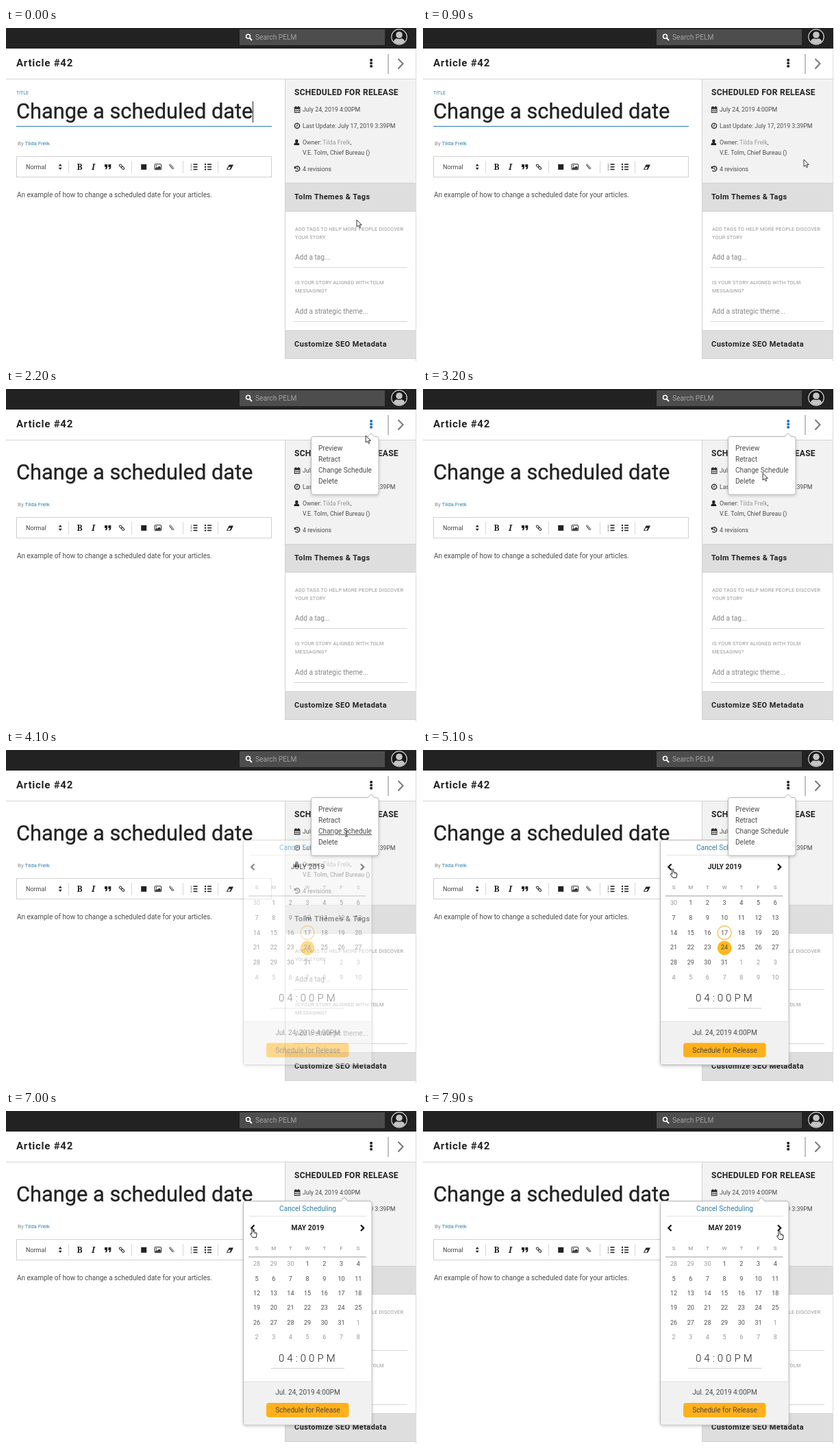
These frames come from a looping animation (600 by 486 pixels, 8 s). An HTML page:

```html
<!DOCTYPE html>
<html lang="en">
<head>
<meta charset="utf-8">
<title>Change a scheduled date</title>
<style>
  html, body { margin: 0; width: 100%; height: 100%; overflow: hidden; background: #fff; }
  svg { display: block; width: 100%; height: 100%; }
  text { font-family: Roboto, "Open Sans", sans-serif; white-space: pre; }
</style>
</head>
<body>
<svg id="stage" viewBox="0 0 600 486"></svg>
<script>
const LOOP = 8000;
const INK = '#222', BODY = '#4c4c4c', BLUE = '#2b7fab', AMBER = '#ffb01a';

// Markup helpers
const attrs = o => Object.entries(o).map(([k, v]) => ` ${k}="${v}"`).join('');
const text = (x, y, size, fill, label, more = {}) =>
  `<text${attrs({ x, y, 'font-size': size, fill, ...more })}>${label}</text>`;
const rect = (x, y, width, height, fill, more = {}) =>
  `<rect${attrs({ x, y, width, height, fill, ...more })}/>`;
const circle = (cx, cy, r, fill, more = {}) => `<circle${attrs({ cx, cy, r, fill, ...more })}/>`;
const path = (d, fill, more = {}) => `<path${attrs({ d, fill, ...more })}/>`;
const stroke = (d, color, width = 1, more = {}) =>
  path(d, 'none', { stroke: color, 'stroke-width': width, ...more });
const group = (id, body, more = {}) => `<g${attrs({ id, ...more })}>${body}</g>`;
const BOLD = { 'font-weight': 700 }, LIGHT = { 'font-weight': 300 }, MID = { 'text-anchor': 'middle' };
const spaced = n => ({ 'letter-spacing': n });

function topBars() {
  return rect(0, 0, 599, 30, '#222') +
    rect(341, 2, 212, 23, '#4d4d4d') +
    circle(353.5, 12.3, 3, 'none', { stroke: '#fff', 'stroke-width': 1.6 }) +
    stroke('M355.7 14.6L359 18', '#fff', 2) +
    text(364, 16.7, 10.2, '#a2a2a2', 'Search PELM') +
    circle(574, 13, 11.2, '#161616', { stroke: '#d8d8d8', 'stroke-width': 1.2 }) +
    circle(574, 10, 4.8, '#c4c4c4') +
    path('M565.8 20Q566.8 15.6 570.5 15.2Q574 16.6 577.5 15.2Q581.2 15.6 582.2 20Q578.8 23.6 574 23.6T565.8 20Z', '#c4c4c4') +
    text(15, 55.5, 15, INK, 'Article #42', { ...BOLD, ...spaced(.75) }) +
    stroke('M0 74.5H599', '#d4d4d4') +
    group('dots', [46.8, 51.3, 55.8].map(y => rect(531.3, y - 1.8, 3.7, 3.6, 'inherit', { rx: 1.2 })).join('')) +
    stroke('M558 38V67', '#999', 1.2) +
    stroke('M572.5 45L579.5 52L572.5 59.5', '#777', 2);
}

function toolbar() {
  const listRows = [199, 202.7, 206.4];
  const quote = x => path(`M${x} 199h4v4q0 3-3 3.5v-1.6q1-.4 1-1.9h-2Z`, INK);
  const lists = listRows.map((y, i) =>
    rect(273.5, y - .8, 6, 1.6, INK) + rect(294, y - .8, 6, 1.6, INK) + circle(291, y, 1.2, INK) +
    text(269.3, y + 1.5, 4.2, INK, i + 1)).join('');
  return rect(15.5, 187.5, 372, 30, '#fff', { stroke: '#d0d0d0' }) +
    stroke('M91.5 194V212M183.5 194V212M258.5 194V212M309.5 194V212', '#d8d8d8') +
    text(29, 206, 9, '#444', 'Normal') +
    path('M76.7 201.6L79.2 198.3L81.7 201.6ZM76.7 203.8H81.7L79.2 207Z', INK) +
    text(103.6, 206.6, 12, INK, 'B', { ...BOLD, style: 'font-family:Noto Serif,serif' }) +
    text(125, 206.6, 12, INK, 'I', { ...BOLD, 'font-style': 'italic', style: 'font-family:Noto Serif,serif' }) +
    quote(144) + quote(149.3) +
    group('link', [-2.7, 2.7].map(x => rect(x - 2.7, -1.7, 5.4, 3.4, 'none', { rx: 1.7, stroke: INK, 'stroke-width': 1.2 })).join(''),
      { transform: 'translate(169 202.7) rotate(45) scale(.85)' }) +
    rect(197.2, 198.8, 8, 8, INK) +
    rect(217, 198.7, 9.5, 8, 'none', { stroke: INK, 'stroke-width': 1, rx: .6 }) +
    circle(219.6, 201.2, .9, INK) + path('M218 205.8V204.4L220 202.8L221.2 204L223.6 201.3L225.6 203.6V205.8Z', INK) +
    stroke('M239.5 200.4L243.4 205Q244.8 206.4 245 204.6L240.8 199.5Q239 197.6 238.4 200L243 206', '#444', .9) +
    lists +
    path('M321.8 206.8L325.6 199.5H332L328.2 206.8Z', INK) +
    path('M323.5 205.9L325.2 202.7H328.2L326.5 205.9Z', '#fff');
}

function article() {
  const focus = text(15, 97, 7, BLUE, 'TITLE') + stroke('M15 143.5H388', 'inherit', 1, { id: 'underline' });
  return group('focus', focus) +
    text(15, 131.5, 30.8, INK, 'Change a scheduled date', { stroke: INK, 'stroke-width': .35 }) +
    group('caret', stroke('M360.5 107V138', '#222')) +
    text(17, 170.5, 7.9, '#888', `By <tspan fill="${BLUE}">Tilda Frelk</tspan>`) +
    toolbar() +
    text(16, 247, 10, BODY, 'An example of how to change a scheduled date for your articles.');
}

function sidebar() {
  const small = (y, label) => text(433, y, 8.8, BODY, label);
  const hint = (y, label) => text(422, y, 7.3, '#949494', label, spaced(.2));
  const field = (y, label) => text(422, y, 10.1, '#868686', label) + stroke(`M420 ${y + 12}H586`, '#d6d6d6');
  const section = (y, label) => rect(407, y, 191, 41, '#dedede') +
    stroke(`M407 ${y}.5H598M407 ${y + 41}.5H598`, '#d2d2d2') +
    text(421, y + 24, 11, INK, label, { ...BOLD, ...spaced(.43) });
  const icons =
    rect(421.3, 115.7, 7.6, 7.6, 'none', { stroke: INK, 'stroke-width': 1 }) +
    stroke('M421 117.2H429', INK, 2) + stroke('M423.2 114V117M427 114V117', INK, 1.2) +
    stroke('M421 120.5H429M423.8 118V123M426.4 118V123', INK, .6) +
    circle(425, 142.7, 3.6, 'none', { stroke: INK, 'stroke-width': 1.4 }) +
    stroke('M425.2 140.5V143.2H423.4', INK, 1) +
    circle(424.3, 164.9, 2.3, INK) + path('M420.5 171V169.5Q421 167 424.3 167T428.1 169.5V171Z', INK) +
    stroke('M422 203.4A3.7 3.7 0 1 1 422.4 208', INK, 1.3) + path('M420.7 201.4V205.2H424.4Z', INK) +
    stroke('M425.1 203.4V206.2H427', INK, 1);
  return rect(407, 75, 191, 151, '#f2f2f2') +
    text(421, 98, 12, INK, 'SCHEDULED FOR RELEASE', { ...BOLD, ...spaced(.3) }) +
    icons + small(122, 'July 24, 2019 4:00PM') +
    small(146, 'Last Update: July 17, 2019 3:39PM') +
    small(170, 'Owner: <tspan fill="#999">Tilda Frelk</tspan>,') +
    small(185, 'V.E. Tolm, Chief Bureau ()') + small(209, '4 revisions') +
    section(226, 'Tolm Themes &amp; Tags') +
    hint(295.7, 'ADD TAGS TO HELP MORE PEOPLE DISCOVER') + hint(307.7, 'YOUR STORY') +
    field(337.5, 'Add a tag...') +
    hint(374, 'IS YOUR STORY ALIGNED WITH TOLM') + hint(386, 'MESSAGING?') +
    field(416.5, 'Add a strategic theme...') +
    section(441, 'Customize SEO Metadata') +
    stroke('M407.5 75V482', '#d0d0d0') + stroke('M598.5 30V486', '#ddd');
}

const columnX = i => 366 + 24.7 * i;

function calendar(month) {
  const names = ['JANUARY', 'FEBRUARY', 'MARCH', 'APRIL', 'MAY', 'JUNE', 'JULY'];
  const scheduled = month === 6;
  const rowGap = scheduled ? 21.7 : 21.4;
  const firstWeekday = new Date(2019, month, 1).getDay();
  let out = text(440.5, 174, 10.3, INK, names[month] + ' 2019', { ...BOLD, ...MID });
  for (let i = 0; i < 42; i++) {
    const date = new Date(2019, month, 1 - firstWeekday + i);
    const inMonth = date.getMonth() === month, day = date.getDate();
    const x = columnX(i % 7), y = 223 + rowGap * Math.floor(i / 7);
    if (scheduled && inMonth && day === 17) out += circle(x, y + .3, 10, 'none', { stroke: '#f6c566', 'stroke-width': 1.4 });
    if (scheduled && inMonth && day === 24) out += circle(x, y + .8, 10.3, '#ffb81c');
    out += text(x, y + 3.2, 9, inMonth ? BODY : '#999', day, MID);
  }
  return out;
}

// The popover is slightly taller while the scheduled day is marked.
function popover(month) {
  const drop = month === 6 ? 0 : -1.5, bottom = 459.5 + drop;
  return path(`M349.5 131.5H489.5L494 126L498.5 131.5H531Q534 131.5 534 134.5V${bottom - 3}Q534 ${bottom} 531 ${bottom}H349.5Q346.5 ${bottom} 346.5 ${bottom - 3}V134.5Q346.5 131.5 349.5 131.5Z`,
      '#fff', { stroke: '#b8b8b8', filter: 'url(#shadow)' }) +
    path(`M347 ${396.5 + drop}H533.5V${bottom - 3}Q533.5 ${bottom - .5} 531 ${bottom - .5}H349.5Q347 ${bottom - .5} 347 ${bottom - 3}Z`, '#f1f1f1') +
    stroke(`M347 ${396.5 + drop}H533.5`, '#ddd') +
    text(440.5, 146, 10.1, BLUE, 'Cancel Scheduling', MID) +
    stroke('M355 153.5H526', '#e3e3e3') +
    stroke('M362.5 166.5L358.3 170.7L362.5 175M518 166.5L522.2 170.7L518 175', '#111', 2.2) +
    [...'SMTWTFS'].map((d, i) => text(columnX(i), 203, 8, '#888', d, MID)).join('') +
    stroke('M354 213H525.5', '#999') +
    calendar(month) +
    text(398, 367.3 + drop, 15, '#222', '04:00PM', { ...LIGHT, ...spaced(4) }) +
    stroke(`M387 ${377 + drop}H494`, '#ccc') +
    text(440.5, 415.5 + drop, 10.15, BODY, 'Jul. 24, 2019 4:00PM', MID) +
    rect(380, 427.5 + drop, 120.5, 21, AMBER, { rx: 4 }) +
    text(440.5, 441.5 + drop, 10.15, BODY, 'Schedule for Release', MID);
}

function menu() {
  const items = ['Preview', 'Retract', 'Change Schedule', 'Delete'];
  return path('M448.5 69.5H528.5L533 64.5L537.5 69.5H541Q544 69.5 544 72.5V151Q544 154 541 154H448.5Q445.5 154 445.5 151V72.5Q445.5 69.5 448.5 69.5Z',
      '#fff', { stroke: '#b8b8b8', filter: 'url(#shadow)' }) +
    items.map((label, i) => text(456, 89.8 + 16.2 * i, 10.1, BODY, label, i === 2 ? { id: 'scheduleItem' } : {})).join('');
}

const tooltip = rect(535.5, 63, 70, 11, '#fff', { stroke: '#888', 'stroke-width': .8, filter: 'url(#shadow)' }) +
  text(538, 71, 6.5, '#555', 'Show More Options', { style: 'font-family:Open Sans,sans-serif' });

const pointers = {
  arrow: path('M0 0V10.2L2.4 8L4 11.6L5.6 10.9L4.1 7.4H7.2Z', '#fff', { stroke: '#222', 'stroke-width': .9 }),
  hand: path('M-1 1Q0-.6 1.1 1V5L4.3 5.6Q6.3 6 6.2 8L5.2 13H0L-3.2 8.6Q-3.4 7-2.2 7L-1 8Z', '#fff', { stroke: '#222', 'stroke-width': 1 }) +
    stroke('M2.7 6V8M4.5 6.3V8.2', '#222', .6),
  beam: stroke('M-2.2-4.2H-.5L0-3.7L.5-4.2H2.2M0-3.7V3.7M-2.2 4.2H-.5L0 3.7L.5 4.2H2.2', '#333', 1)
};

document.getElementById('stage').innerHTML =
  '<defs><filter id="shadow" x="-10%" y="-10%" width="120%" height="120%"><feDropShadow dx="0" dy="1.5" stdDeviation="2" flood-opacity=".2"/></filter></defs>' +
  rect(0, 0, 600, 486, '#fff') + topBars() + article() + sidebar() +
  group('popover', [6, 5, 4].map(m => group('month' + m, popover(m))).join('')) +
  group('menu', menu()) + group('tooltip', tooltip) +
  group('cursor', Object.entries(pointers).map(([k, v]) => group(k, v)).join(''));

// Motion
const cursorPath = [
  [0, 512, 280], [150, 512, 280], [900, 556, 192], [1200, 536, 44], [1400, 533, 50.5], [2000, 533, 50.5],
  [2700, 494, 138], [3150, 496, 123], [3400, 497, 122], [4500, 497, 122], [5050, 365, 173.5],
  [5400, 360, 171.5], [7200, 360, 171.5], [7800, 520, 174.5], [LOOP, 520, 174.5]
];
const pointerTimes = [
  [0, 'arrow'], [1250, 'hand'], [2100, 'arrow'], [3300, 'beam'], [4600, 'arrow'], [5000, 'hand'], [7300, 'arrow'], [7700, 'hand']
];

const smooth = p => p * p * (3 - 2 * p);
const ramp = (t, from, to) => smooth(Math.min(1, Math.max(0, (t - from) / (to - from))));
const between = (t, from, to) => t >= from && t < to;
const $ = id => document.getElementById(id);
const show = (id, on) => $(id).setAttribute('visibility', on ? 'inherit' : 'hidden');

function cursorAt(t) {
  const i = cursorPath.findIndex(k => k[0] > t);
  const [t0, x0, y0] = cursorPath[i - 1], [t1, x1, y1] = cursorPath[i];
  const p = ramp(t, t0, t1);
  return [x0 + (x1 - x0) * p, y0 + (y1 - y0) * p];
}

function draw(t) {
  $('focus').setAttribute('opacity', 1 - ramp(t, 1950, 2200));
  $('underline').setAttribute('stroke', t < 1000 ? '#2f7ba6' : '#5d9091');
  show('caret', t < 2000 && t % 1000 < 500);
  $('dots').setAttribute('fill', between(t, 1300, 3900) ? '#1273c4' : '#222');
  show('tooltip', between(t, 1550, 2000));
  show('menu', between(t, 2100, 5500));
  $('scheduleItem').setAttribute('text-decoration', between(t, 3300, 4600) ? 'underline' : 'none');
  $('popover').setAttribute('opacity', ramp(t, 3900, 4300));
  const month = t < 5600 ? 6 : t < 6800 ? 5 : 4;
  for (const m of [6, 5, 4]) show('month' + m, m === month);
  $('cursor').setAttribute('transform', `translate(${cursorAt(t).map(v => v.toFixed(2)).join(' ')})`);
  const kind = pointerTimes.filter(k => k[0] <= t).pop()[1];
  for (const k in pointers) show(k, k === kind);
}

const start = performance.now();
function tick() {
  draw((performance.now() - start) % LOOP);
  requestAnimationFrame(tick);
}
tick();
</script>
</body>
</html>
```
